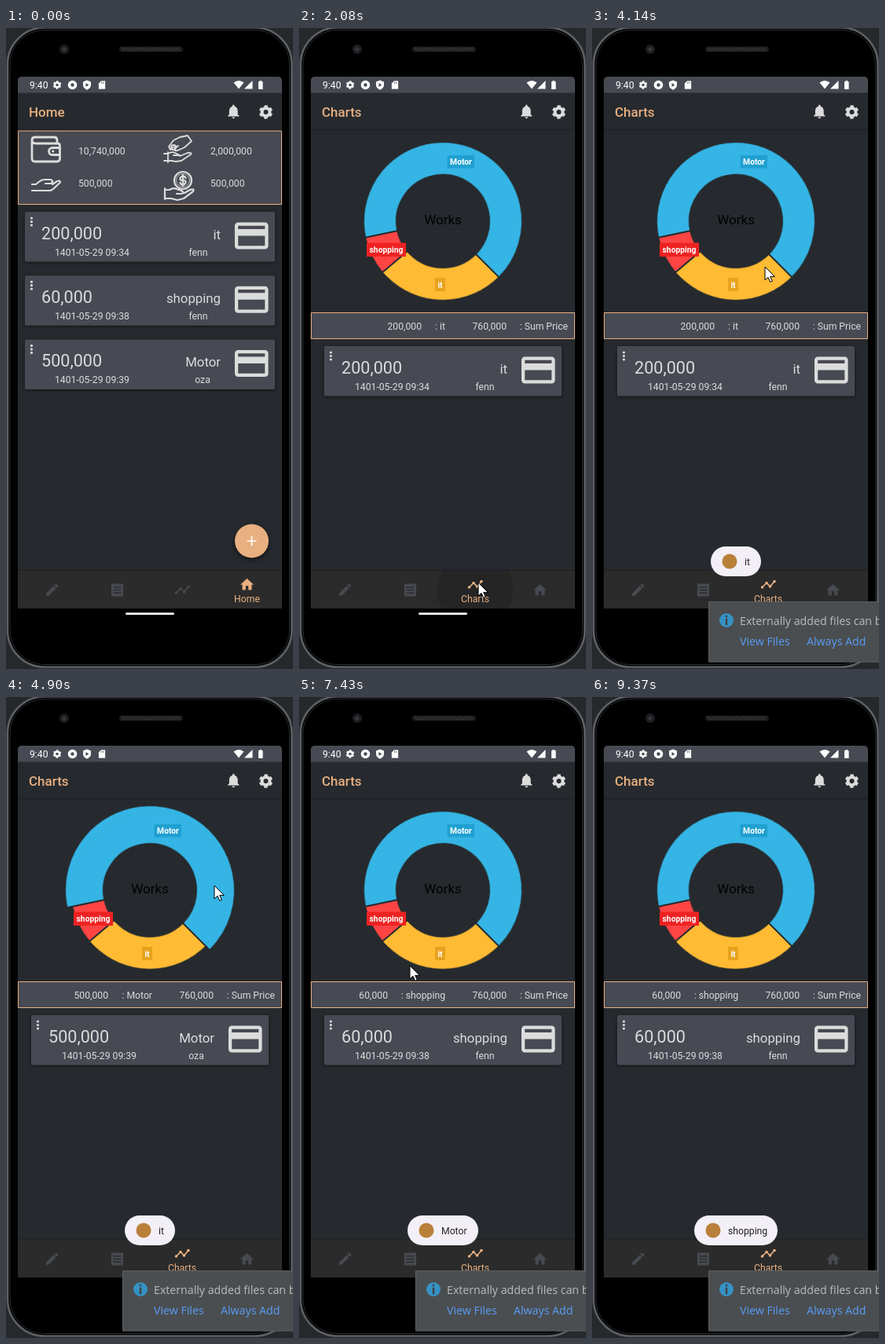
Write an HTML page that moves like this. It is 365 by 816 pixels and loops after 9.76 s.

```html
<!DOCTYPE html>
<html lang="en">
<head>
<meta charset="utf-8">
<title>Budget app</title>
<style>
html, body { margin: 0; width: 100%; height: 100%; overflow: hidden; background: #26282b; }
svg { display: block; width: 365px; height: 816px; }
text { font: 12.2px Roboto, sans-serif; fill: #dcdcdc; white-space: pre; }
.end { text-anchor: end; }
.mid { text-anchor: middle; }
.big { font-size: 21.6px; }
.name { font-size: 16.8px; }
.title { font-size: 17px; font-weight: 500; fill: #e8b081; }
.tag { font-size: 10.3px; font-weight: 700; fill: #fff; text-anchor: middle; }
.note text { font: 14.2px "Open Sans", sans-serif; fill: #bbb; }
.note .link { fill: #589df6; }
.line { fill: none; stroke: #dcdcdc; stroke-width: 2.2; stroke-linecap: round; stroke-linejoin: round; }
.panel { fill: #474a53; stroke: #e8b081; }
.card { filter: drop-shadow(0 1px 2px #0008); }

/* One 9.76 s loop: .go glides, .cut holds each pose. */
.go { animation: 9.76s linear infinite; }
.cut { animation: 9.76s step-end infinite; }

#cursor { animation-name: cursor; }
@keyframes cursor {
  0%, 3.15% { opacity: 0; transform: translate(280px, 536px); }
  3.17% { opacity: 1; transform: translate(280px, 536px); }
  12.6% { transform: translate(236px, 697px); }
  13.3% { transform: translate(232px, 698px); }
  14.1%, 27.7% { transform: translate(228px, 706px); }
  35.3%, 44% { transform: translate(220px, 304px); }
  47.8%, 55.8% { transform: translate(265px, 240px); }
  61.15%, 61.6% { transform: translate(137px, 278px); }
  65.9%, 75.4% { transform: translate(109px, 289px); }
  76.1%, 76.6% { transform: translate(141px, 342px); }
  77.6%, 80.3% { transform: translate(217px, 526px); }
  90.3%, 90.5% { transform: translate(305px, 699px); }
  96%, 100% { opacity: 1; transform: translate(337px, 818px); }
}

#home { animation-name: home; }
@keyframes home { 0% { opacity: 1; } 17.4% { opacity: .9; } 18.2% { opacity: .65; } 18.9% { opacity: .25; } 19.7%, 100% { opacity: 0; } }
#charts { animation-name: charts; }
@keyframes charts { 0% { opacity: 0; } 17.4% { opacity: .1; } 18.2% { opacity: .35; } 18.9% { opacity: .7; } 19.7%, 100% { opacity: 1; } }

.before { animation-name: before; }
@keyframes before { 0% { opacity: 1; } 17.4%, 100% { opacity: 0; } }
.after { animation-name: after; }
@keyframes after { 0% { opacity: 0; } 17.4%, 100% { opacity: 1; } }
#blank { animation-name: blank; }
@keyframes blank { 0% { opacity: 1; } 21.3%, 100% { opacity: 0; } }
#data { animation-name: data; }
@keyframes data { 0% { opacity: 0; } 21.3%, 100% { opacity: 1; } }

#pick0 { animation-name: pick0; }
@keyframes pick0 { 0% { opacity: 0; } 21.3% { opacity: 1; } 50.2%, 100% { opacity: 0; } }
#pick1 { animation-name: pick1; }
@keyframes pick1 { 0% { opacity: 0; } 50.2% { opacity: 1; } 67.4%, 100% { opacity: 0; } }
#pick2 { animation-name: pick2; }
@keyframes pick2 { 0% { opacity: 0; } 67.4%, 100% { opacity: 1; } }

#bump0 { animation-name: bump0; }
@keyframes bump0 { 0% { opacity: 0; } 37.7% { opacity: 1; } 39.2%, 100% { opacity: 0; } }
#bump1 { animation-name: bump1; }
@keyframes bump1 { 0% { opacity: 0; } 49.48% { opacity: 1; } 50.9%, 100% { opacity: 0; } }
#bump2 { animation-name: bump2; }
@keyframes bump2 { 0% { opacity: 0; } 66.7% { opacity: 1; } 68.2%, 100% { opacity: 0; } }

#toast0 { animation-name: toast0; }
@keyframes toast0 { 0%, 39.2% { opacity: 0; } 42.3%, 62.5% { opacity: 1; } 65%, 100% { opacity: 0; } }
#toast1 { animation-name: toast1; }
@keyframes toast1 { 0%, 66.6% { opacity: 0; } 69%, 86% { opacity: 1; } 88.5%, 100% { opacity: 0; } }
#toast2 { animation-name: toast2; }
@keyframes toast2 { 0%, 91% { opacity: 0; } 93.8%, 99.99% { opacity: 1; } 100% { opacity: 0; } }

#note { animation-name: note; }
@keyframes note { 0%, 22% { opacity: 0; } 25.9%, 99.99% { opacity: 1; } 100% { opacity: 0; } }
#ripple { animation-name: ripple; }
@keyframes ripple { 0%, 17.8% { opacity: 0; } 20%, 22% { opacity: 1; } 25.5%, 100% { opacity: 0; } }

#homeTab { animation-name: homeTab; }
@keyframes homeTab { 0% { color: #e8b081; transform: translateY(-7px); } 17.4% { color: #474a50; transform: translateY(-7px); } 18.9% { color: #474a50; transform: translateY(-3px); } 19.7%, 100% { color: #474a50; transform: none; } }
#homeLabel { animation-name: homeLabel; }
@keyframes homeLabel { 0% { opacity: 1; } 18.9% { opacity: .3; } 19.7%, 100% { opacity: 0; } }
#chartTab { animation-name: chartTab; }
@keyframes chartTab { 0% { color: #474a50; transform: none; } 17.4% { color: #e8b081; transform: none; } 18.9% { color: #e8b081; transform: translateY(-4px); } 19.7%, 100% { color: #e8b081; transform: translateY(-7px); } }
#chartLabel { animation-name: chartLabel; }
@keyframes chartLabel { 0% { opacity: 0; } 17.4% { opacity: .1; } 18.9% { opacity: .6; } 19.7%, 100% { opacity: 1; } }
</style>
</head>
<body>
<svg viewBox="0 0 365 816">
  <defs>
    <clipPath id="bar"><path d="M15 691h336v48H15z"/></clipPath>
    <g id="gear" fill="none" stroke="currentColor">
      <circle r="5" stroke-width="4"/>
      <circle r="7.4" stroke-width="2.6" pathLength="12" stroke-dasharray="1.1 .9" transform="rotate(14)"/>
    </g>
    <g id="pay"><path fill="#dcdcdc" d="M20 4H4a2 2 0 0 0-2 2v12a2 2 0 0 0 2 2h16a2 2 0 0 0 2-2V6a2 2 0 0 0-2-2zm0 14H4v-6h16zm0-10H4V6h16z"/></g>
  </defs>

  <!-- phone body -->
  <rect x="2" y="-.5" width="361.500" height="814" rx="47" fill="#000" stroke="#5d6064" stroke-width="2.600"/>
  <rect x="5" y="2.500" width="355.500" height="808" rx="44" fill="#000" stroke="#2c2e30"/>
  <circle cx="74" cy="27" r="6" fill="#1d1e20"/><circle cx="74" cy="27" r="2.6" fill="#34373b"/>
  <rect x="144" y="23.5" width="81" height="7" rx="3.5" fill="#1b1c1d"/>
  <path d="M147 25.7h75M148.500 28.300h73" stroke="#444" stroke-width="1.4" stroke-dasharray="1.5 1.5"/>
  <rect x="152" y="744.300" width="62" height="2.6" rx="1.3" fill="#f2f2f2"/>

  <!-- screen and top bars -->
  <path d="M15 739V67a5 5 0 0 1 5-5h326a5 5 0 0 1 5 5v672z" fill="#262a2e"/>
  <path d="M15 82.500V67a5 5 0 0 1 5-5h326a5 5 0 0 1 5 5v15.500z" fill="#474a53"/>
  <path d="M15 129.500h336" stroke="#202328" stroke-width="2"/>
  <g color="#fff" fill="#fff">
    <text x="30" y="77" style="fill:#fff">9:40</text>
    <use href="#gear" transform="translate(65 72.500) scale(.6)"/>
    <circle cx="84.500" cy="72.500" r="4" fill="none" stroke="#fff" stroke-width="3.6"/>
    <path d="M103 66.500l5 2v4q0 4-5 6.300q-5-2.300-5-6.300v-4zm-1.500 3.500v5l3.800-2.500z" fill-rule="evenodd"/>
    <path d="M121 67h5.500v11h-9v-7.500zm.500 1.500v2.500m2-2.500v2.500" stroke="#474a53" stroke-width=".7"/>
    <path d="M289.500 69.500q6.500-5 13 0l-6.500 8zM313.500 67v10.500H303zM321 68.300h1.500v-1.300h2.600v1.300h1.500v9.700H321z"/>
  </g>
  <text class="title before cut" x="29" y="113">Home</text>
  <text class="title after cut" x="29" y="113">Charts</text>
  <path transform="translate(278.500 95.500) scale(.9)" fill="#dcdcdc" d="M12 22a2 2 0 0 0 2-2h-4a2 2 0 0 0 2 2zm6-6v-5c0-3.100-1.600-5.600-4.500-6.300V4a1.500 1.500 0 0 0-3 0v.7C7.600 5.400 6 7.900 6 11v5l-2 2v1h16v-1z"/>
  <use href="#gear" x="330.500" y="107" color="#dcdcdc"/>

  <g id="home" class="cut">
    <path class="panel" d="M15.500 131h335v93.500h-335z"/>
    <g class="line">
      <path stroke-width="2.800" d="M65 147v-4q0-4-4-4H37q-4 0-4 4v23q0 4 4 4h28q3.500 0 3.500-4v-16q0-3-3-3H38q-4 0-5-4M68 152.500H59a4.500 4.500 0 0 0 0 9h9M59.500 157h.5"/>
      <path d="M33 199h5l5-4q3-2 6-2h7q3 0 3 2.500t-3 2.500h-6M59 199l6-4q4-1.500 4 1.500l-9 8.500q-2 2-5 2H33"/>
      <g stroke-width="1.800">
        <path d="M207 151l6-8 8-4 10-2 5 7-9 8-9 4q-5 1-3-3l4-3-7 2-3 3zM231 137l5 7M201 160h5q5-3 9-1l6 3h-8M221 163l10-4q6-1 4 2l-12 8-7 1-6-1h-9M206 158v13"/>
        <circle cx="213" cy="152" r="3"/>
      </g>
      <circle cx="225" cy="194" r="11"/><circle cx="225" cy="194" r="8.500" stroke-width=".8"/>
      <path d="M228.500 191q-1-2.500-3.500-2.500t-3.500 2.800 3.500 2.700 3.500 2.700-3.500 2.800-3.500-2.500M225 187v14"/>
      <path d="M202 206h6q5-3 9-1l6 2q4 2 1 4h-7M227 210l7-4q6-2 4 2l-12 9-8 2-8-2h-8M202 204v14"/>
    </g>
    <text x="92" y="161">10,740,000</text><text x="260" y="161">2,000,000</text>
    <text x="92" y="202">500,000</text><text x="260" y="202">500,000</text>
    <g id="list"></g>
    <g style="filter:drop-shadow(0 2px 3px #0009)"><circle cx="312.500" cy="653" r="21.500" fill="#e8b081"/></g>
    <path d="M306.500 653h12m-6-6v12" stroke="#fff" stroke-width="1.700"/>
  </g>

  <g id="charts" class="cut">
    <path class="panel" d="M15.500 362.500h335v33h-335z"/>
    <text class="end" x="342" y="384">: Sum Price</text>
    <g id="blank" class="cut">
      <circle cx="183" cy="246" r="100" fill="#e0e0e0"/>
      <g id="blankCuts" stroke="#262a2e" stroke-width="2"></g>
      <text class="end" x="264" y="384">Price</text><text class="end" x="202" y="384">: Work Name</text><text class="end" x="112" y="384">Price</text>
    </g>
    <g id="data" class="cut">
      <g id="donut"></g>
      <text class="mid" x="183" y="250" style="font-size:17px;fill:#000">Works</text>
      <path fill="#1fa0d0" d="M188.500 162h34.500v16.500h-34.500z"/><text class="tag" x="206" y="174">Motor</text>
      <path fill="#ee2222" d="M86 273.500h50v17.500H86z"/><text class="tag" x="111" y="286">shopping</text>
      <path fill="#e8a31e" d="M173 318h13v17h-13z"/><text class="tag" x="179.500" y="331">it</text>
      <text class="end" x="264" y="384">760,000</text>
      <g id="picks"></g>
    </g>
  </g>

  <!-- bottom bar -->
  <path d="M15 690h336" stroke="#212428" stroke-width="2"/>
  <path d="M15 691h336v48H15z" fill="#2b2b2b"/>
  <g clip-path="url(#bar)"><circle id="ripple" class="go" cx="224" cy="715" r="48" fill="#252525"/></g>
  <path transform="translate(48.500 705) scale(.85)" fill="#474a50" d="M3 17.250V21h3.750L17.800 9.940l-3.750-3.750zM20.700 7a1 1 0 0 0 0-1.400l-2.300-2.300a1 1 0 0 0-1.400 0l-1.900 1.800 3.800 3.800z"/>
  <path fill="#474a50" fill-rule="evenodd" d="M134 707.500h15v16h-15zm2.500 3.500v1.500h10V711zm0 3.700v1.500h10v-1.500zm0 3.700v1.500h10v-1.500z"/>
  <g id="chartTab" class="cut">
    <path d="M216.500 719l5.500-5.500 4.500 4.500 5.500-6.500" fill="none" stroke="currentColor" stroke-width="1.700"/>
    <g fill="currentColor"><circle cx="216.500" cy="719" r="1.800"/><circle cx="222" cy="713.500" r="1.800"/><circle cx="226.500" cy="718" r="1.800"/><circle cx="232" cy="711.500" r="1.800"/></g>
  </g>
  <text id="chartLabel" class="mid cut" x="224" y="731" style="fill:#e8b081">Charts</text>
  <g id="homeTab" class="cut"><path transform="translate(296.300 705.300) scale(.85)" fill="currentColor" d="M10 20v-6h4v6h5v-8h3L12 3 2 12h3v8z"/></g>
  <text id="homeLabel" class="mid cut" x="306.500" y="731" style="fill:#e8b081">Home</text>

  <g id="toasts"></g>

  <g id="note" class="note go">
    <path d="M148.500 730.500H370v76.500H148.500z" fill="#4b4e50" stroke="#5c5f61"/>
    <circle cx="171" cy="754" r="9" fill="#3592c4"/>
    <path d="M171 749v.1m0 3.900v6" stroke="#3f4244" stroke-width="2.400" stroke-linecap="square"/>
    <text x="188" y="760">Externally added files can be added</text>
    <text class="link" x="188" y="786">View Files</text>
    <text class="link" x="273" y="786">Always Add</text>
  </g>

  <path id="cursor" class="go" d="M0 0v17l4-3.700 2.700 6.100 2.600-1.200-2.600-5.800h5.600z" fill="#fff" stroke="#000"/>
</svg>

<script>
const $ = id => document.getElementById(id);

const works = [
  { name: "it", value: 200, sum: "200,000", date: "1401-05-29 09:34", owner: "fenn", color: "#ffbb33", sumX: 156, toastX: 151, toastW: 64 },
  { name: "Motor", value: 500, sum: "500,000", date: "1401-05-29 09:39", owner: "oza", color: "#35b5e5", sumX: 130, toastX: 138, toastW: 90 },
  { name: "shopping", value: 60, sum: "60,000", date: "1401-05-29 09:38", owner: "fenn", color: "#ff4444", sumX: 113, toastX: 130, toastW: 106 }
];

// Start angles and sweeps of a pie that begins at 45 degrees.
const slices = values => {
  const total = values.reduce((a, b) => a + b);
  let from = 45;
  return values.map(v => {
    const slice = { from, sweep: v / total * 360 };
    from += slice.sweep;
    return slice;
  });
};

const order = [works[0], works[2], works[1]];
slices(order.map(w => w.value)).forEach((s, i) => Object.assign(order[i], s));

const card = (w, x, y, width) => {
  const r = x + width, pad = width < 310 ? 1 : 0;
  const ownerX = r - (w.owner.length < 4 ? 92 : 97.5);
  const dots = [8, 12.5, 17].map(d => `<circle cx="${x + 8.5}" cy="${y + d}" r="1.6" fill="#dcdcdc"/>`).join("");
  return `<rect class="card" x="${x}" y="${y}" width="${width}" height="63.5" rx="2" fill="#474a53"/>${dots}
    <text class="big" x="${x + 21 + pad}" y="${y + 35}">${w.sum}</text>
    <text x="${x + 38 + pad}" y="${y + 55.5}">${w.date}</text>
    <text class="name end" x="${r - 69}" y="${y + 35}">${w.name}</text>
    <text class="mid" x="${ownerX}" y="${y + 55.5}">${w.owner}</text>
    <use href="#pay" transform="translate(${r - 55.3} ${y + 5}) scale(2.13)"/>`;
};

const ring = (w, r, width, attrs = "") =>
  `<circle ${attrs} cx="183" cy="246" r="${r}" fill="none" stroke="${w.color}" stroke-width="${width}"
    pathLength="360" stroke-dasharray="${w.sweep} 360" transform="rotate(${w.from} 183 246)"/>`;

const spoke = (angle, r) => `<path d="M183 246h${r}" transform="rotate(${angle} 183 246)"/>`;

$("list").innerHTML = order.map((w, row) => card(w, 24, 234 + row * 81.2, 318)).join("");
$("blankCuts").innerHTML = slices([4, 2, 3, 5]).map(s => spoke(s.from, 101)).join("");

$("donut").innerHTML =
  works.map((w, i) => ring(w, 80, 40) + ring(w, 103, 8, `id="bump${i}" class="cut"`)).join("") +
  `<g stroke="#262a2e" stroke-width="2">${works.map(w => spoke(w.from, 108)).join("")}</g>`;

$("picks").innerHTML = works.map((w, i) => `<g id="pick${i}" class="cut">
  <text class="end" x="186" y="384">: ${w.name}</text>
  <text class="end" x="${w.sumX}" y="384">${w.sum}</text>${card(w, 32, 405, 302)}</g>`).join("");

$("toasts").innerHTML = works.map((w, i) => `<g id="toast${i}" class="go">
  <rect x="${w.toastX}" y="660" width="${w.toastW}" height="38" rx="19" fill="#f3eff6"/>
  <circle cx="${w.toastX + 24}" cy="679" r="9.5" fill="#b9803a"/>
  <text x="${w.toastX + 43}" y="683.5" style="fill:#222">${w.name}</text></g>`).join("");
</script>
</body>
</html>
```
